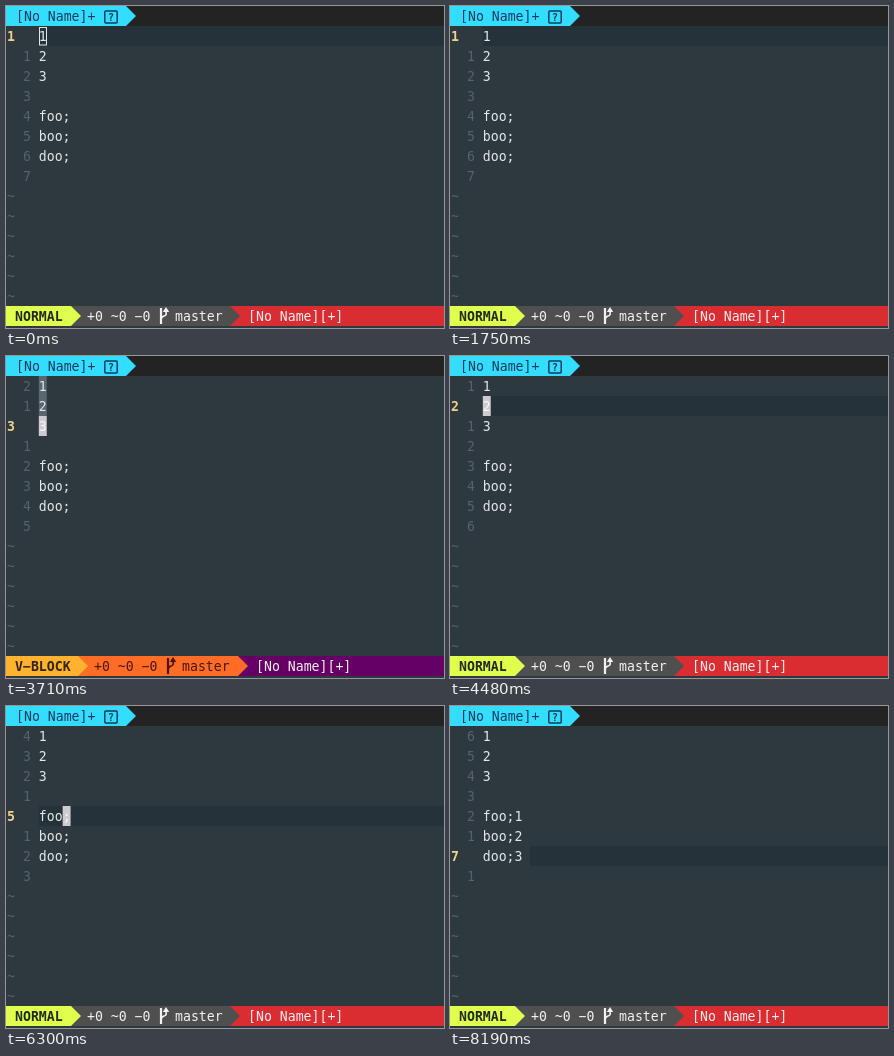
An HTML page that plays this animation: 438x322 px, repeating every 8330 ms.

```html
<!DOCTYPE html>
<html lang="en">
<head>
<meta charset="utf-8">
<title>Block paste in an editor</title>
<style>
html, body { margin: 0; width: 100%; height: 100%; overflow: hidden; background: #2d383f; }
svg { display: block; width: 438px; height: 322px; }
text { font: 13.2px "DejaVu Sans Mono", "Noto Sans Mono", monospace; white-space: pre; }
.bold { font-weight: bold; }
</style>
</head>
<body>
<svg id="stage" viewBox="0 0 438 322"></svg>
<script>
const LOOP = 8330;
const CELL = 7.95;
const ROW = 20;
const stage = document.getElementById('stage');

const THEMES = {
  normal: { label: 'NORMAL', a: '#dfff4c', b: '#4e4f4e', c: '#da2d32', ink: '#222a1c', info: '#f2f2f2', edge: 65, end: 224 },
  block: { label: 'V−BLOCK', a: '#ffb22e', b: '#ff6c25', c: '#650066', ink: '#33240c', info: '#4b1606', edge: 72, end: 232 }
};

// [start, mode, row, column]
const STEPS = [
  [0, 'normal', 0, 0],
  [1960, 'block', 0, 0],
  [2520, 'block', 1, 0],
  [2870, 'block', 2, 0],
  [4060, 'normal', 0, 0],
  [4410, 'normal', 1, 0],
  [4620, 'normal', 2, 0],
  [4900, 'normal', 3, 0],
  [5460, 'normal', 4, 0],
  [5880, 'normal', 4, 3],
  [6790, 'normal', 6, 5]
];
const PASTE = 6790;

// [time, opacity], linear between points
const BLINK = [
  [0, 1], [70, 1], [280, 0], [560, 0], [700, 1], [1050, 1], [1260, 0],
  [1330, 0], [1470, 1], [1540, 1], [1750, 0], [1950, 0], [1960, 1],
  [6930, 1], [7140, 0], [7350, 0], [7630, 1], [7910, 1], [8190, 0], [LOOP, 0]
];

const colX = c => 1 + c * CELL;
const rowY = r => ROW + r * ROW;
const rect = (x, y, w, h, fill, extra = '') =>
  `<rect x="${x}" y="${y}" width="${w}" height="${h}" fill="${fill}" ${extra}/>`;
const shape = (d, fill) => `<path d="${d}" fill="${fill}"/>`;
const text = (x, y, s, fill, cls = '') =>
  `<text x="${x}" y="${y}" fill="${fill}" class="${cls}">${s}</text>`;
const tag = (x, y, fill) => shape(`M0 ${y}H${x}L${x + 10} ${y + 10}L${x} ${y + 20}H0Z`, fill);

function opacityAt(t) {
  const i = BLINK.findIndex(p => p[0] > t);
  const [t0, v0] = BLINK[i - 1], [t1, v1] = BLINK[i];
  return v0 + (v1 - v0) * (t - t0) / (t1 - t0);
}

function tabBar() {
  const ink = '#123c5c';
  return rect(0, 0, 438, 20, '#222322') + tag(120, 0, '#33ddff') +
    text(10, 15, '[No Name]+', ink) +
    rect(98.8, 5, 12.4, 12, 'none', `stroke="${ink}" stroke-width="1.5" rx="1"`) +
    `<text x="105" y="14.7" fill="${ink}" class="bold" text-anchor="middle" style="font-size:10px">?</text>`;
}

function statusBar(mode) {
  const k = THEMES[mode], x = k.edge;
  const branch = `<g transform="translate(${x + 88} 0)" fill="none" stroke="${k.info}">` +
    '<path d="M2 302V318" stroke-width="2.2"/><path d="M2 314Q2 311 5 310T7 306V304" stroke-width="1.6"/>' +
    `<path d="M3.8 306L7 301L10.2 306Z" fill="${k.info}" stroke="none"/></g>`;
  return rect(0, 300, 438, 20, k.c) + tag(k.end, 300, k.b) + tag(x, 300, k.a) +
    text(9, 315, k.label, k.ink, 'bold') +
    text(x + 16, 315, '+0 ~0 −0', k.info) + branch +
    text(x + 104, 315, 'master', k.info) +
    text(k.end + 18, 315, '[No Name][+]', '#fbeeee');
}

function buffer(t) {
  const tail = n => t >= PASTE ? n : '';
  return ['1', '2', '3', '', 'foo;' + tail(1), 'boo;' + tail(2), 'doo;' + tail(3), ''];
}

function cursor(t, row, col, char) {
  const x = colX(4 + col), y = rowY(row);
  const body = t < 280
    ? rect(x + 0.7, y + 1.5, 7, 17.5, 'none', 'stroke="#e4e6e6"')
    : rect(x, y, CELL, ROW, '#cdcbd0') + text(x, y + 15, char, '#f8f8f8');
  return `<g opacity="${opacityAt(t)}">${body}</g>`;
}

function draw(t) {
  const [, mode, row, col] = STEPS.filter(s => s[0] <= t).pop();
  const lines = buffer(t);
  let out = rect(0, 0, 438, 322, '#2d383f');

  if (mode === 'block') {
    out += rect(colX(4), rowY(0), CELL, row * ROW, '#5b676e');
  } else {
    const left = t >= PASTE ? 80 : colX(4);
    out += rect(left, rowY(row), 438 - left, ROW, '#263239');
  }

  lines.forEach((line, i) => {
    const y = rowY(i) + 15;
    out += i === row
      ? text(colX(0), y, i + 1, '#efd08c', 'bold')
      : text(colX(2), y, Math.abs(i - row), '#56636b');
    out += text(colX(4), y, line, '#e3e7e8');
  });
  for (let i = lines.length; i < 14; i++) out += text(colX(0), rowY(i) + 15, '~', '#56636b');

  out += cursor(t, row, col, lines[row][col] || '');
  stage.innerHTML = out + tabBar() + statusBar(mode);
}

const start = performance.now();
function tick() {
  draw((performance.now() - start) % LOOP);
  requestAnimationFrame(tick);
}
tick();
</script>
</body>
</html>
```
